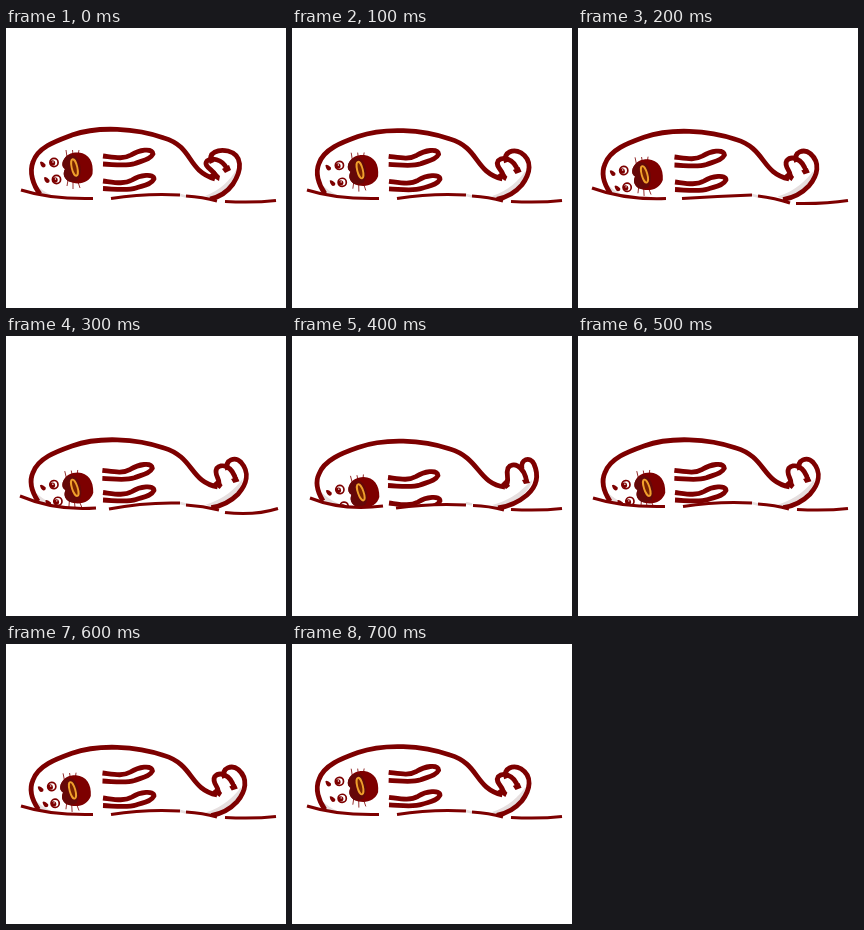
An HTML page for the animation above (800 ms loop, 280 px wide and 280 px high).

```html
<!DOCTYPE html>
<html lang="en">
<head>
<meta charset="utf-8">
<title>Resting seal</title>
<style>
  html, body { margin: 0; width: 100%; height: 100%; overflow: hidden; background: #fff; }
  svg { display: block; width: 100vw; height: 100vh; }
  .line { fill: none; stroke: #7d0000; stroke-width: 4.8; stroke-linejoin: round; }
  .ink { fill: #7d0000; }
  .white { fill: #fff; }
  .shade { fill: #e6dfdf; }
  .hair { fill: none; stroke: #7d0000; stroke-width: .8; }
  #ground { stroke-width: 3; }
</style>
</head>
<body>
<svg viewBox="0 0 280 280">
  <path id="shade" class="shade"/>
  <path class="shade" d="M28 155Q36 163 47 168L34 168Z"/>
  <path id="body" class="line"/>
  <path id="inner" class="line"/>
  <path id="outer" class="line"/>
  <path id="wedges" class="ink"/>
  <g id="head">
    <path class="hair" d="M61 129L60 122M67 127L66.5 122M72 127L73 122M62 152L61 158M67 154L67 161M72 154L74 160"/>
    <path class="ink" d="M57 133C60 126 66 124 73 124.500C83 126 88 134 86.500 146C83 155 72 158 62 153C57 149 57 145 59 141C56 139 56 136 57 133Z"/>
    <path fill="#650808" d="M57 133C60 127 65 126 69 128C75 132 77 145 72 152C68 154 64 154 62 153C57 149 57 145 59 141C56 139 56 136 57 133Z"/>
    <ellipse cx="68.500" cy="139.500" rx="2.800" ry="8.500" transform="rotate(-13 68.5 139.5)" fill="#7a2200" stroke="#f0a02c" stroke-width="1.900"/>
    <g id="eye">
      <circle class="white" cx="48" cy="134.500" r="4.100" stroke="#7d0000" stroke-width="1.700"/>
      <circle class="ink" cx="46.500" cy="135" r="2.700"/>
      <circle class="white" cx="47" cy="134" r=".7"/>
    </g>
    <use href="#eye" x="2.500" y="17"/>
    <path id="brow" class="ink" d="M34 134Q36 132.500 39.500 136.500Q40 139.500 37 139.500Q34.500 138.500 34 134Z"/>
    <use href="#brow" x="4" y="15.500"/>
  </g>
  <path id="fin1" class="line" d="M97 128C109 129.500 117 131.500 125 127C133 122 146 119.500 147 126C144 132 136 132.500 129 135.500C120 138.500 109 136.500 97 136"/>
  <path id="fin2" class="line" d="M97 153C109 154.500 118 156.500 126 152C134 147 148 145 148 151C145 157 137 157.500 130 160C121 163 109 161 97 160.500"/>
  <path id="cover" class="white"/>
  <path d="M174 167L180 168.500" stroke="#e6dfdf" stroke-width="2.500"/>
  <path id="ground" class="line"/>
</svg>
<script>
const $ = id => document.getElementById(id);

// Each pair: relaxed shape, stretched shape
const shapes = {
  body: [
    'M34 166C27 157 23 144 27 134C32 119 50 113 66 107C92 98 130 100 158 110C188 119 180 142 209 151',
    'M31 165C25 155 23 146 27 138C32 124 50 117 66 111.5C92 102 130 103.5 158 113C188 122 186 148 213 151'],
  inner: [
    'M210 150C211 143 196 139 201 133C205 130 216 130 221 141',
    'M213 151C219 144 213 140 216 132C220 126 232 128 235 147'],
  outer: [
    'M206 135C201 124 213 121 222 123C237 127 236 142 227 156C222 163 214 169 204 171',
    'M230 133C228 123 238 120 242 128C248 142 243 152 235 159C228 165 220 170 206 172'],
  wedges: [
    'M203 147L213 153L214 148L209 143ZM216 141L223 137L225 142L219 145Z',
    'M209 148L214 153L218 150L214 143ZM230 144L236 143L238 147L232 148Z'],
  shade: [
    'M199 168C215 162 224 152 230 142C231 152 220 166 206 171Z',
    'M200 169C221 164 232 152 240 144C240 154 222 168 208 172Z']
};

const flat = 'M15 162Q45 171.5 87 170.5M105 170.5Q140 165 174 167M180 168Q197 169 211 173M219 173.5Q248 175 270 172.5';
const dip = 'M14 160Q46 172 88 170.5M104 170.5Q140 168 174 167M180 168Q197 170 212 175M218 175.5Q248 176 270 172.5';
const sag = 'M14 160Q49 175 90 172M103 173Q138 166 174 167M180 169Q197 170 213 174M219 176.5Q248 180 272 172.5';
const low = 'M18 162Q50 175 91 170M104 172Q140 167 174 169M181 169.5Q197 170 212 174M219 173.5Q248 175 270 172.5';
const grounds = [flat, flat, dip, sag, low, flat, flat, flat];

// stretch, head x, head y, head turn, upper fin drop, lower fin drop
const poses = [
  [0, 0, 0, 0, 0, 0],
  [.35, -.5, 2.5, -1, .3, .3],
  [.52, -2, 6.7, -3, 1, 1],
  [.65, .3, 12, -5, 6.3, 3.5],
  [1, .3, 16.5, -6, 13.5, 14]
];

const mix = ([a, b], k) => {
  const to = b.match(/[\d.]+/g);
  let i = 0;
  return a.replace(/[\d.]+/g, n => (+n + (to[i++] - n) * k).toFixed(2));
};
const set = (id, name, value) => $(id).setAttribute(name, value);

let last = -1;
function draw(now) {
  const step = Math.floor(now / 100) % 8;
  if (step !== last) {
    last = step;
    const [k, x, y, turn, up, down] = poses[Math.min(step, 8 - step)];
    for (const id in shapes) set(id, 'd', mix(shapes[id], k));
    set('head', 'transform', `translate(${x} ${y}) rotate(${turn} 72 140)`);
    set('fin1', 'transform', `translate(${-k} ${up})`);
    set('fin2', 'transform', `translate(0 ${down})`);
    set('ground', 'd', grounds[step]);
    set('cover', 'd', 'M0 160' + grounds[step].replace(/M/g, 'L') + 'L280 280H0Z');
  }
  requestAnimationFrame(draw);
}
draw(performance.now());
</script>
</body>
</html>
```
